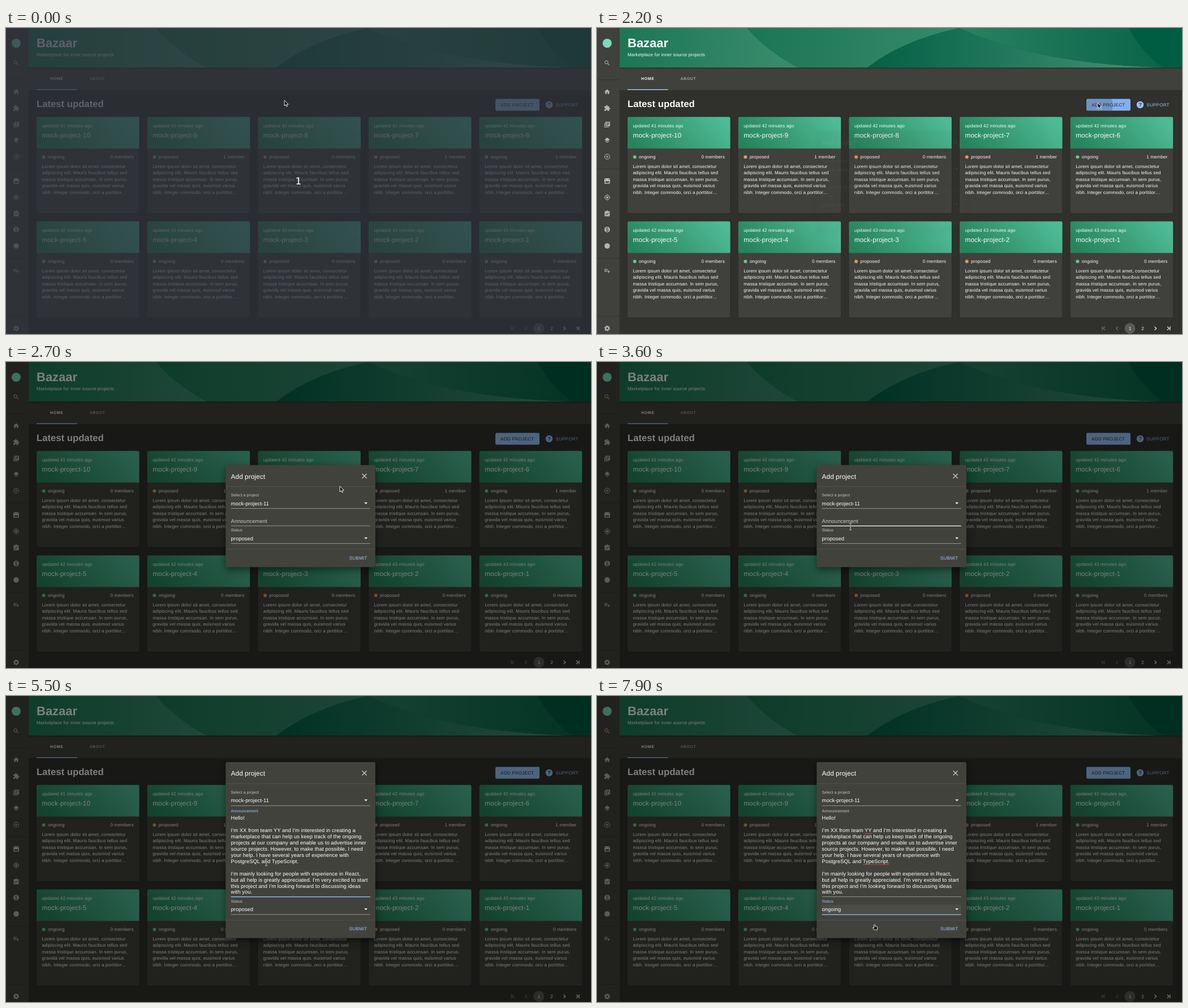
These frames come from a looping animation (1034x542 px, 8000 ms). An HTML page:

```html
<!DOCTYPE html>
<html lang="en">
<head>
<meta charset="utf-8">
<title>Add project</title>
<style>
html, body { margin: 0; width: 100%; height: 100%; overflow: hidden; background: #31312d; }
svg { display: block; width: 1034px; height: 542px; }
text { font-family: "Liberation Sans", Arial, sans-serif; text-rendering: geometricPrecision; white-space: pre; }
.card { filter: drop-shadow(0 .8px .8px rgba(0,0,0,.3)); }
.paper { filter: drop-shadow(0 5px 7px rgba(0,0,0,.5)); }
</style>
</head>
<body>
<svg viewBox="0 0 1034 542" xmlns="http://www.w3.org/2000/svg">
  <defs>
    <linearGradient id="wave0"><stop stop-color="#1d7957"/><stop offset="1" stop-color="#3c9071"/></linearGradient>
    <linearGradient id="wave1"><stop stop-color="#1c7856"/><stop offset="1" stop-color="#388d6e"/></linearGradient>
    <linearGradient id="wave2"><stop stop-color="#046246"/><stop offset="1" stop-color="#46977a"/></linearGradient>
    <linearGradient id="wave3"><stop stop-color="#2c8464"/><stop offset="1" stop-color="#0a674a"/></linearGradient>
    <linearGradient id="cardTop" gradientUnits="userSpaceOnUse" x1="35" y1="75" x2="145" y2="-20"><stop stop-color="#27875d"/><stop offset="1" stop-color="#50bf9a"/></linearGradient>
    <linearGradient id="shade" x1="0" y1="0" x2="0" y2="1"><stop stop-opacity=".3"/><stop offset="1" stop-opacity="0"/></linearGradient>
    <clipPath id="buttonClip"><rect x="865" y="125.5" width="78" height="21" rx="2.3"/></clipPath>
  </defs>
  <g id="page"></g>
  <g id="live"></g>
</svg>
<script>
const LOOP = 8000, STEP = 100;
const PAPER = '#42423d', BLUE = '#9cc9ff', WHITE = '#fff', SOFT = 'rgba(255,255,255,.7)';

const text = (x, y, s, size = 8.15, fill = WHITE, extra = 'letter-spacing=".0107em"') =>
  `<text x="${x}" y="${y}" font-size="${size}" fill="${fill}" ${extra}>${s}</text>`;
const rect = (x, y, w, h, fill, extra = '') =>
  `<rect x="${x}" y="${y}" width="${w}" height="${h}" fill="${fill}" ${extra}/>`;
const circle = (x, y, r, fill, extra = '') =>
  `<circle cx="${x}" cy="${y}" r="${r}" fill="${fill}" ${extra}/>`;
const path = (d, fill, extra = '') => `<path d="${d}" fill="${fill}" ${extra}/>`;
const BUTTON = 'text-anchor="middle" letter-spacing=".0286em"';

// Piecewise linear value: keys are [time, ...values].
function track(keys, t) {
  const i = keys.findIndex(k => k[0] > t);
  if (i === 0) return keys[0].slice(1);
  if (i < 0) return keys[keys.length - 1].slice(1);
  const [a, b] = [keys[i - 1], keys[i]], p = (t - a[0]) / (b[0] - a[0]);
  return a.slice(1).map((v, n) => v + (b[n + 1] - v) * p);
}

// ---- Static page ----
const ICONS = [
  [62, 'M15.5 14h-.8l-.3-.3a6.5 6.5 0 1 0-.7.7l.3.3v.8l5 5 1.5-1.5zm-6 0a4.5 4.5 0 1 1 0-9 4.5 4.5 0 0 1 0 9z'],
  [113, 'M10 20v-6h4v6h5v-8h3L12 3 2 12h3v8z'],
  [142, 'M20.5 11H19V7a2 2 0 0 0-2-2h-4V3.5a2.5 2.5 0 0 0-5 0V5H4a2 2 0 0 0-2 2v3.8h1.5a2.7 2.7 0 0 1 0 5.4H2V20a2 2 0 0 0 2 2h3.8v-1.5a2.7 2.7 0 0 1 5.4 0V22H17a2 2 0 0 0 2-2v-4h1.5a2.5 2.5 0 0 0 0-5z'],
  [171, 'M4 6H2v16h16v-2H4zM6 2v16h16V2zm13 9H9V9h10zm-4 4H9v-2h6zm4-8H9V5h10z'],
  [199, 'M12 18.5l-7.4-5.7L3 14l9 7 9-7-1.6-1.2zM12 16l9-7-9-7-9 7z'],
  [228, 'M13 7h-2v4H7v2h4v4h2v-4h4v-2h-4zM12 2a10 10 0 1 0 0 20 10 10 0 0 0 0-20zm0 18a8 8 0 1 1 0-16 8 8 0 0 1 0 16z'],
  [271, 'M22 9l-2-6H4L2 9c0 1.500 .4 2.300 1 3v9h18v-9c.6-.7 1-1.500 1-3zM5.500 5H8l-.5 5H4zM10 5h1v5H9.500zm3 0h1l.5 5H13zm3 0h2.500L20 10h-3.500zM5 19v-6c2 0 3-.5 4-1.500 1.500 1.500 4.500 1.500 6 0 1 1 2 1.500 4 1.500v6z'],
  [300, 'M12 8a4 4 0 1 0 0 8 4 4 0 0 0 0-8zm9 3a9 9 0 0 0-8-8V1h-2v2a9 9 0 0 0-8 8H1v2h2a9 9 0 0 0 8 8v2h2v-2a9 9 0 0 0 8-8h2v-2zm-9 8a7 7 0 1 1 0-14 7 7 0 0 1 0 14z'],
  [329, 'M21 3h-6a3 3 0 0 0-6 0H3v18h18zM10 17l-4-4 1.400-1.400 2.600 2.600 6.600-6.600L18 9z'],
  [357, 'M12 2a10 10 0 1 0 0 20 10 10 0 0 0 0-20zm1.400 16v2h-2.700v-2c-1.700-.3-3-1.400-3.200-3.200h2c.2 1 .8 1.700 2.500 1.700 3 0 3-2.500 0-3.200-2.500-.6-4.200-1.500-4.200-3.600 0-1.800 1.300-2.900 2.900-3.200V4.500h2.700v2c1.900.4 2.800 1.800 2.900 3.300h-2c-.2-2.400-4.500-2.100-4.500-.2 0 .8.6 1.300 2.600 1.800s4.200 1.300 4.200 3.800c0 1.700-1.400 2.600-3.200 2.800z'],
  [430, 'M14 10H2v2h12zm0-4H2v2h12zm4 8v-4h-2v4h-4v2h4v4h2v-4h4v-2zM2 16h8v-2H2z'],
];

function gear(x, y) {
  return `<g transform="translate(${x} ${y})">` + circle(0, 0, 2.8, 'none', 'stroke="#b8b8b4" stroke-width="2.2"') +
    circle(0, 0, 4.4, 'none', 'stroke="#b8b8b4" stroke-width="1.4" stroke-dasharray="2.3 2.3"') + '</g>';
}

function sidebar() {
  let s = rect(0, 0, 40, 542, PAPER) + circle(18, 27, 8, '#7ce0c3');
  for (const y of [91.5, 249.5, 407.5, 510]) s += rect(0, y, 40, .7, '#2f2f2b');
  for (const [y, d] of ICONS)
    s += `<g transform="translate(12 ${y - 6}) scale(.5)">${path(d, y === 271 ? WHITE : '#b8b8b4')}</g>`;
  return s + circle(18, 386, 4.8, '#b8b8b4') + gear(18, 532);
}

function header() {
  return rect(40, 0, 994, 70, '#005f43') +
    path('M40 0H265Q302 42 355 70H40Z', 'url(#wave0)') +
    path('M265 0Q302 42 355 70H478Q540 22 640 0Z', 'url(#wave1)') +
    path('M640 0Q540 22 478 70H1000Q780 64 640 0Z', 'url(#wave2)') +
    path('M640 0Q780 64 1000 70Q960 40 940 0Z', 'url(#wave3)') +
    text(54, 33.7, 'Bazaar', 22, WHITE, 'font-weight="700"') +
    text(54, 50.3, 'Marketplace for inner source projects') +
    rect(40, 70, 994, 40, PAPER) + rect(40, 70, 994, 3, 'url(#shade)') + rect(54, 108.5, 71.5, 1.5, BLUE) +
    text(89.8, 92.4, 'HOME', 6.9, WHITE, 'font-weight="700" text-anchor="middle" letter-spacing=".1em"') +
    text(161.4, 92.4, 'ABOUT', 6.9, '#aaaaa6', 'font-weight="700" text-anchor="middle" letter-spacing=".1em"') +
    text(54, 139.7, 'Latest updated', 16.7, WHITE, 'font-weight="700"');
}

const LOREM = ['Lorem ipsum dolor sit amet, consectetur', 'adipiscing elit. Mauris faucibus tellus sed',
  'massa tristique accumsan. In sem purus,', 'gravida vel massa quis, euismod varius',
  'nibh. Integer commodo, orci a porttitor…'];

function card(i) {
  const number = 10 - i, minutes = i === 0 ? 41 : i < 7 ? 42 : 43;
  const proposed = [9, 8, 7, 3, 2].includes(number);
  const members = [9, 7, 6].includes(number) ? '1 member' : '0 members';
  const x = 54 + 195.67 * (i % 5), y = i < 5 ? 157.6 : 342.6;
  return `<g transform="translate(${x} ${y})">` + rect(0, 0, 181.5, 170.5, PAPER, 'rx="2.3" class="card"') +
    path('M0 56V2.3Q0 0 2.300 0H179.200Q181.500 0 181.500 2.300V56Z', 'url(#cardTop)') +
    text(9.5, 18.3, `updated ${minutes} minutes ago`) +
    text(9.5, 36.2, `mock-project-${number}`, 11.75, WHITE, 'letter-spacing=".0075em"') +
    circle(12.7, 70.8, 3, proposed ? '#dda25c' : '#69cf7e') + text(20, 73.7, proposed ? 'proposed' : 'ongoing') +
    text(171.8, 73.7, members, 8.15, WHITE, 'text-anchor="end" letter-spacing=".0107em"') +
    LOREM.map((line, n) => text(9.5, 90 + 11.5 * n, line)).join('') + '</g>';
}

function pager() {
  const arrow = (x, dir, color, bar) => path(`M${x - 1.5 * dir} 528.800L${x + 1.7 * dir} 532L${x - 1.5 * dir} 535.200` +
    (bar ? `M${x + 3.4 * dir} 528.600V535.400` : ''), 'none', `stroke="${color}" stroke-width="1.2"`);
  return arrow(896.5, -1, '#777773', true) + arrow(919.3, -1, '#777773') + circle(942, 532, 9.5, '#5b5b57') +
    text(942, 535, '1', 8.15, WHITE, 'text-anchor="middle"') + text(964.5, 535, '2', 8.15, WHITE, 'text-anchor="middle"') +
    arrow(987, 1, WHITE) + arrow(1009.5, 1, WHITE, true);
}

function support() {
  return circle(960, 136, 6.2, BLUE) + text(960, 139.2, '?', 9.3, '#31312d', 'text-anchor="middle" font-weight="700"') +
    text(991.5, 138.7, 'SUPPORT', 8.05, BLUE, BUTTON);
}

document.getElementById('page').innerHTML = sidebar() + header() +
  Array.from({ length: 10 }, (_, i) => card(i)).join('') + pager() + support();

// ---- Moving parts ----
const CURSOR = [[600, 492, 128], [700, 520, 131], [800, 620, 135], [900, 697, 135], [1000, 697, 135],
  [1100, 715, 135], [1300, 815, 135], [1500, 877, 133], [1600, 885, 132.5], [2300, 885, 132.5],
  [2500, 800, 150], [2700, 590, 220], [2900, 465, 258], [3000, 450, 265], [3100, 449, 283], [3200, 448, 291.5],
  [5400, 448, 291.5], [5500, 460, 294.5], [5600, 493, 283.5], [5700, 493, 283.5], [6000, 491, 350],
  [6200, 490, 384], [6800, 490, 384], [7000, 502, 398], [7100, 490.5, 404.3]];
const APPEAR = [[2100, 0], [2200, .05], [2300, .8], [2400, 1]];
const RIPPLE = [[2100, 10, .22], [2200, 25, .22], [2300, 44, .22], [2400, 60, .15], [2500, 70, 0]];
const SHRINK = [[3600, 0], [3700, .35], [3800, .85], [3900, 1]];
const MENU = [[6400, 0], [6500, .45], [6600, .88], [6700, 1], [7600, 1], [7700, .85], [7800, .35], [7900, 0]];

const NOTE = ['Hello!', '', "I'm XX from team YY and I'm interested in creating a",
  'marketplace that can help us keep track of the ongoing', 'projects at our company and enable us to advertise inner',
  'source projects. However, to make that possible, I need', 'your help. I have several years of experience with',
  'PostgreSQL and TypeScript.', '', "I'm mainly looking for people with experience in React,",
  "but all help is greatly appreciated. I'm very excited to start", "this project and I'm looking forward to discussing ideas",
  'with you.'];

const between = (t, a, b) => t >= a && t < b;
const field = (x, y, s, size = 9.3, fill = WHITE) => text(x, y, s, size, fill, 'letter-spacing=".0094em"');
const underline = (y, bold, color) => rect(397.6, y, 246, bold ? 1.2 : .6, color || (bold ? WHITE : SOFT));
const arrowDown = y => path(`M633.200 ${y}h5.800l-2.900 2.900z`, WHITE);

function addButton(t) {
  const hover = between(t, 1500, 2400), [r, alpha] = track(RIPPLE, t);
  return rect(865, 125.5, 78, 21, hover ? '#86b4f6' : BLUE, 'rx="2.3" class="card"') +
    (between(t, 2100, 2500) ? `<g clip-path="url(#buttonClip)">${circle(887, 137, r, '#31312d', `opacity="${alpha}"`)}</g>` : '') +
    text(903.7, 138.7, 'ADD PROJECT', 8.05, '#262a30', BUTTON);
}

function announcement(t, grown) {
  const focused = between(t, 3700, 6400), [p] = track(SHRINK, t);
  const shift = grown ? 65.5 : 0;
  const half = 123 * p;
  let s = field(397.6, 285 - 13.5 * p - shift, 'Announcement', 9.4 - 2.36 * p, focused ? BLUE : SOFT);
  s += underline(289.8 + shift, between(t, 3100, 3700));
  if (focused) s += rect(520.6 - half, 289.6 + shift, 2 * half, 1.2, BLUE);
  if (grown) s += NOTE.map((line, i) => field(397.6, 219.4 + 10.92 * i, line)).join('');
  if (between(t, 3900, 4400)) s += rect(397.4, 276, .7, 11, WHITE);
  if (between(t, 4600, 5500)) s += rect(435.6, 341.5, .7, 10.5, WHITE);
  if (t >= 5800) s += rect(473.5, 243.6, 12, .8, '#d9573f') + rect(470.5, 298, 45.5, .8, '#e0453f');
  return s;
}

function status(t) {
  const focused = t >= 6400, hover = between(t, 6100, 6400);
  return (focused ? rect(397.6, 304, 246, 17, WHITE, 'opacity=".05"') : '') +
    field(397.6, 300, 'Status', 7.04, focused ? BLUE : SOFT) +
    field(397.6, 315.6, t < 7700 ? 'proposed' : 'ongoing') + arrowDown(310.8) +
    underline(321.2, focused || hover, focused && BLUE);
}

function dialog(t) {
  const [alpha] = track(APPEAR, t);
  if (!alpha) return '';
  const grown = t >= 4600, shift = grown ? 65.5 : 0;
  const top = 182.6 - shift, height = 180.6 + 2 * shift;
  return rect(0, 0, 1034, 542, '#000', `opacity="${alpha * .5}"`) + `<g opacity="${alpha}">` +
    rect(388.3, top, 264.5, height, PAPER, 'rx="2.3" class="paper"') +
    `<g transform="translate(0 ${-shift})">` +
    text(397.6, 206.5, 'Add project', 11.75, WHITE, 'letter-spacing=".0075em"') +
    path('M629.500 198l8 8m0-8l-8 8', 'none', 'stroke="#d0d0cc" stroke-width="1.15"') +
    rect(388.3, 220.3, 264.5, .6, WHITE, 'opacity=".14"') +
    field(397.6, 238.2, 'Select a project', 7.04, SOFT) + field(397.6, 253.5, 'mock-project-11') +
    arrowDown(248.8) + underline(259.4, between(t, 2900, 3100)) + '</g>' +
    announcement(t, grown) +
    `<g transform="translate(0 ${shift})">` + status(t) +
    rect(388.3, 331.2, 264.5, .6, WHITE, 'opacity=".14"') +
    text(622.6, 349.8, 'SUBMIT', 8.05, BLUE, BUTTON) + '</g></g>';
}

function menu(t) {
  const [p] = track(MENU, t);
  if (!p) return '';
  const scale = t < 7000 ? .75 + .25 * p : 1;
  const press = t >= 7600 ? rect(397.4, 388.4, 273.6, 20.7, WHITE, 'opacity=".1"') : '';
  return `<g opacity="${p}" transform="translate(397.4 378) scale(${scale} ${scale * scale}) translate(-397.4 -378)">` +
    rect(397.4, 363, 273.6, 50.6, PAPER, 'rx="2.3" class="paper"') +
    rect(397.4, 367.7, 273.6, 20.7, WHITE, 'opacity=".14"') + press +
    field(406.6, 381.2, 'proposed') + field(406.6, 401.9, 'ongoing') + '</g>';
}

function cursor(t) {
  const [x, y] = track(CURSOR, t);
  const line = 'stroke="#fff" stroke-width=".9" stroke-linejoin="round"';
  let shape;
  if (t < 3100) shape = path('M0 0V9.800L2.300 7.700L3.900 11.200L5.600 10.500L4.100 7.100H7.200Z', '#111', line);
  else if (t < 6000) {
    const d = 'M-2-5.500Q0-5.500 0-4.500Q0-5.500 2-5.500M0-4.500V4.500M-2 5.500Q0 5.500 0 4.500Q0 5.500 2 5.500';
    shape = path(d, 'none', 'stroke="#fff" stroke-width="1.9"') + path(d, 'none', 'stroke="#111" stroke-width=".9"');
  } else shape = path('M-1 .8Q0-.5 1 .8V3.500L4.300 4.200Q5.700 4.600 5.400 6L4.600 9.800H-.6L-3.400 6.300Q-2.800 5-1 6.300Z', '#111', line);
  return `<g transform="translate(${x} ${y})">${shape}</g>`;
}

function countdown(t) {
  return t >= 300 ? '' : rect(0, 0, 1034, 542, '#282c34', 'opacity=".75"') +
    `<text x="516.8" y="277.3" font-size="17" fill="#fff" text-anchor="middle" style="font-family:'DejaVu Sans',sans-serif">1</text>`;
}

const live = document.getElementById('live');
const start = performance.now();
let shown = -1;
function tick(now) {
  const elapsed = Math.max(0, now - start) % LOOP;
  const t = Math.floor(elapsed / STEP) * STEP;
  if (t !== shown) {
    live.innerHTML = addButton(t) + dialog(t) + menu(t) + countdown(t) + cursor(t);
    shown = t;
  }
  requestAnimationFrame(tick);
}
tick(start);
</script>
</body>
</html>
```
